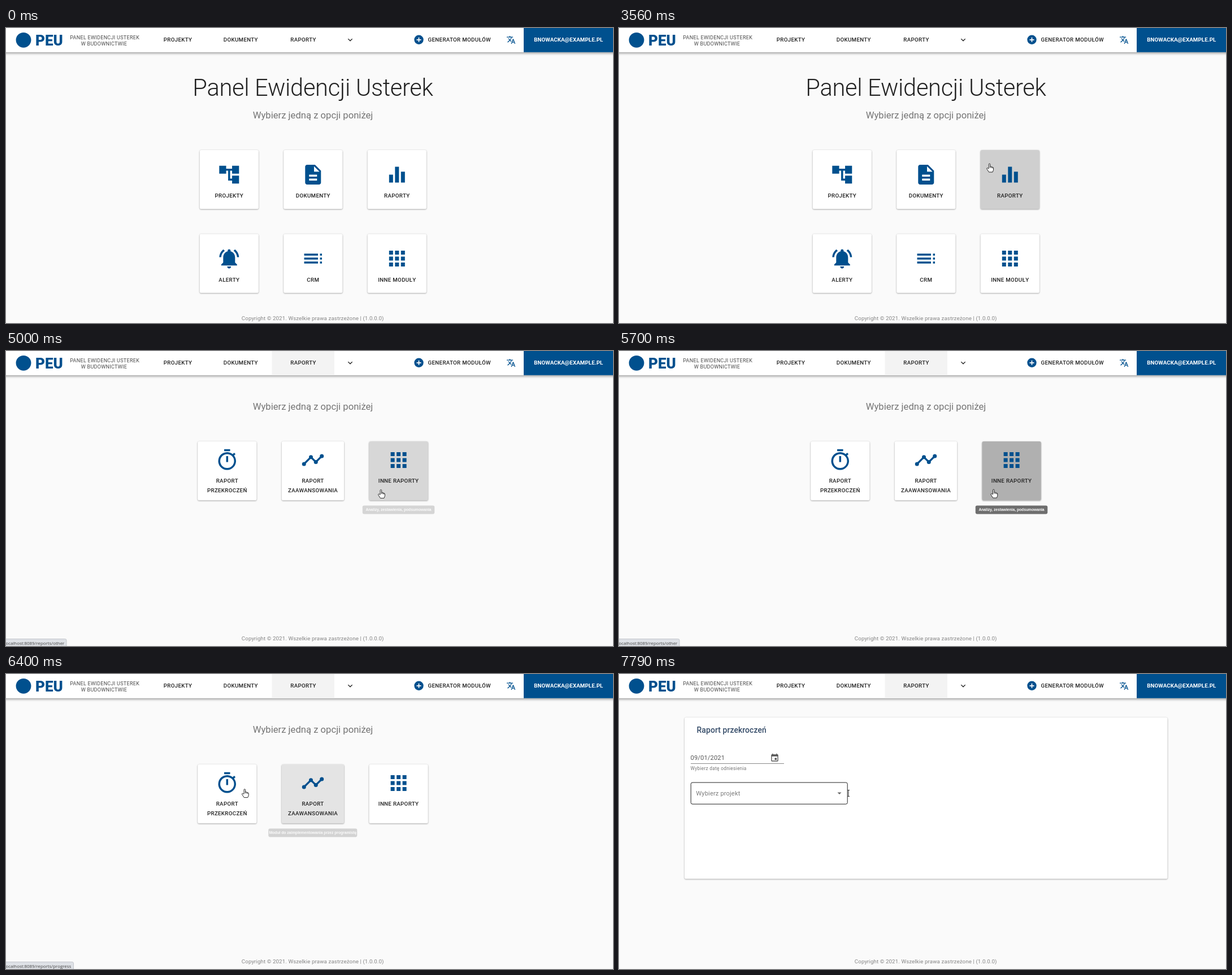
An HTML page that plays this animation: 1074 by 522 pixels, repeating every 8000 ms.

```html
<!DOCTYPE html>
<html lang="pl">
<head>
<meta charset="utf-8">
<title>Panel Ewidencji Usterek</title>
<style>
  html, body { margin: 0; width: 100%; height: 100%; overflow: hidden; background: #fafafa; }
  svg { display: block; }
  text { font-family: Roboto, sans-serif; white-space: pre; }
  .card { fill: #fff; filter: drop-shadow(0 1px 1px rgba(0,0,0,.28)) drop-shadow(0 0 1px rgba(0,0,0,.12)); }
  .bar { fill: #fff; filter: drop-shadow(0 2px 2px rgba(0,0,0,.38)); }
  .tip text { font: bold 6.7px "Liberation Sans", sans-serif; }
  .status text { font-family: "Open Sans", sans-serif; }
</style>
</head>
<body>
<svg id="stage" width="1074" height="522" viewBox="0 0 1074 522"></svg>
<script>
const BLUE = '#00508e', DARK = '#212121', SCALE = 0.694;
const ICONS = {
  tree: 'M22 11V3h-7v3H9V3H2v8h7V8h2v10h4v3h7v-8h-7v3h-2V8h2v3z',
  doc: 'M14 2H6c-1.1 0-2 .9-2 2v16c0 1.1.9 2 2 2h12c1.1 0 2-.9 2-2V8l-6-6zm2 16H8v-2h8v2zm0-4H8v-2h8v2zm-3-5V3.5L18.5 9H13z',
  bars: 'M10 20h4V4h-4v16zm-6 0h4v-8H4v8zM16 9v11h4V9h-4z',
  bell: 'M7.6 4.1L6.15 2.65C3.75 4.5 2.2 7.3 2 10.5h2c.15-2.65 1.5-5 3.6-6.4zm12.4 6.4h2c-.15-3.2-1.7-6-4.1-7.85l-1.45 1.45c2 1.4 3.4 3.75 3.55 6.4zM18 11c0-3.1-1.6-5.6-4.5-6.3V4c0-.8-.7-1.5-1.5-1.5s-1.5.7-1.5 1.5v.7C7.6 5.4 6 7.9 6 11v5l-2 2v1h16v-1l-2-2v-5zm-6 11c1.1 0 2-.9 2-2h-4c0 1.1.9 2 2 2z',
  list: 'M3 7h14v2H3zm0 4h14v2H3zm0 4h14v2H3zM19 7h2v2h-2zm0 4h2v2h-2zm0 4h2v2h-2z',
  apps: [4, 10, 16].map(y => `M4 ${y}h4v4H4zm6 0h4v4h-4zm6 0h4v4h-4z`).join(''),
  timer: 'M15 1H9v2h6V1zm-4 13h2V8h-2v6zm8-6.6l1.45-1.4c-.45-.5-.9-1-1.4-1.45L17.6 6C16.1 4.7 14.1 4 12 4a9 9 0 1 0 7 3.4zM12 20a7 7 0 1 1 0-14 7 7 0 0 1 0 14z',
  translate: 'M12.87 15.07l-2.54-2.51c1.8-2 3-4.2 3.74-6.56H17V4h-7V2H8v2H1v2h11.2C11.5 7.9 10.4 9.75 9 11.35 8.1 10.3 7.3 9.2 6.7 8h-2c.7 1.6 1.7 3.2 3 4.56l-5.1 5L4 19l5-5 3.1 3.1.77-2.03zM18.5 10h-2L12 22h2l1.1-3h4.8l1.1 3h2l-4.5-12zm-2.6 7l1.6-4.3 1.6 4.3h-3.2z',
  chevron: 'M7.4 8.6l4.6 4.6 4.6-4.6L18 10l-6 6-6-6z',
  calendar: 'M17 12h-5v5h5v-5zM16 1v2H8V1H6v2H5c-1.1 0-2 .9-2 2v14c0 1.1.9 2 2 2h14c1.1 0 2-.9 2-2V5c0-1.1-.9-2-2-2h-1V1h-2zm3 18H5V8h14v11z',
  drop: 'M7 10l5 5 5-5z'
};

function text(str, x, y, size, { fill = DARK, weight = 400, anchor = 'middle', gap = 0 } = {}) {
  return `<text x="${x}" y="${y}" font-size="${size}" fill="${fill}" font-weight="${weight}" text-anchor="${anchor}" letter-spacing="${gap}">${str}</text>`;
}
const label = (str, x, y) => text(str, x, y, 9.72, { weight: 500, gap: .32 });
const left = (str, x, y, size, fill, gap, weight) => text(str, x, y, size, { fill, gap, weight, anchor: 'start' });
const icon = (name, x, y, k = 1.75, fill = BLUE) =>
  `<path fill="${fill}" fill-rule="evenodd" transform="translate(${x} ${y}) scale(${k}) translate(-12 -12)" d="${name === 'line' ? '' : ICONS[name]}"/>`;

function lineChart(x, y) {
  const pts = [[-9, 4], [-2, -3], [3, 2], [9, -4]].map(p => [x + p[0] * 1.75, y + p[1] * 1.75]);
  return `<polyline points="${pts.join(' ')}" fill="none" stroke="${BLUE}" stroke-width="3.2"/>` +
    pts.map(([a, b]) => `<circle cx="${a}" cy="${b}" r="3.5" fill="${BLUE}"/>`).join('');
}

function card(id, x, y, w, glyph, lines, iconY, textY) {
  const cx = x + w / 2;
  return `<rect class="card" x="${x}" y="${y}" width="${w}" height="104.2" rx="2.8"/>
    <rect id="${id}-hover" x="${x}" y="${y}" width="${w}" height="104.2" rx="2.8" opacity="0"/>
    <svg x="${x}" y="${y}" width="${w}" height="104.2"><circle id="${id}-ripple" opacity=".14"/></svg>
    ${glyph === 'line' ? lineChart(cx, iconY) : icon(glyph, cx, iconY)}
    ${lines.map((s, i) => label(s, cx, textY + i * 16.4)).join('')}`;
}

function tip(id, cx, w, y, lines) {
  return `<g id="${id}-tip" class="tip" opacity="0">
    <rect x="${cx - w / 2}" y="${y}" width="${w}" height="${lines.length > 1 ? 26 : 15}" rx="2.8" fill="#6e6e6e"/>
    ${lines.map((s, i) => text(s, cx, y + 9.8 + i * 10, 6.7, { fill: '#fff' })).join('')}</g>`;
}

const prompt = y => text('Wybierz jedną z opcji poniżej', 543, y, 16.66, { fill: '#757575' });
const footer = y => text('Copyright © 2021. Wszelkie prawa zastrzeżone | (1.0.0.0)', 542.7, y, 9.72, { fill: '#858585', gap: .1 });
const homeCard = (id, col, row, glyph, name) =>
  card(id, 342.7 + col * 148.5, 216 + row * 148.5, 104.2, glyph, [name], 259.6 + row * 148.5, 300 + row * 148.5);
const reportCard = (id, x, w, glyph, lines) => card(id, x, 160, w, glyph, lines, 193, 233.4);

const home = `<g id="home">
  ${text('Panel Ewidencji Usterek', 543, 119.5, 41.6, { weight: 300, gap: -.3 })}
  ${prompt(160)}
  ${homeCard('projects', 0, 0, 'tree', 'PROJEKTY')}
  ${homeCard('docs', 1, 0, 'doc', 'DOKUMENTY')}
  ${homeCard('reports', 2, 0, 'bars', 'RAPORTY')}
  ${homeCard('alerts', 0, 1, 'bell', 'ALERTY')}
  ${homeCard('crm', 1, 1, 'list', 'CRM')}
  ${homeCard('more', 2, 1, 'apps', 'INNE MODUŁY')}
  ${tip('reports', 691.6, 51, 330, ['Raporty opis'])}
  ${footer(517)}</g>`;

const menu = `<g id="menu">
  ${prompt(104)}
  ${reportCard('excess', 339.2, 104.2, 'timer', ['RAPORT', 'PRZEKROCZEŃ'])}
  ${reportCard('progress', 487.8, 110.4, 'line', ['RAPORT', 'ZAAWANSOWANIA'])}
  ${reportCard('other', 642.5, 104.2, 'apps', ['INNE RAPORTY'])}
  ${tip('excess', 391, 218, 273.4, ['Raport przekroczeń ilości i kosztów względem założonego', 'budżetu projektu'])}
  ${tip('progress', 542.8, 157, 273.4, ['Moduł do zaimplementowania przez programistę'])}
  ${tip('other', 694.5, 127.5, 273.4, ['Analizy, zestawienia, podsumowania'])}
  ${footer(511.5)}</g>`;

const form = `<g id="form">
  <rect class="card" x="116" y="77" width="854.5" height="285.5" rx="2.8"/>
  ${left('Raport przekroczeń', 137.6, 103.5, 13.9, '#344b68', .1, 500)}
  ${left('09/01/2021', 126.6, 151.5, 11.1, '#555', .15)}
  ${icon('calendar', 275.5, 148.5, SCALE, '#555')}
  <path d="M127 158.5H292" stroke="#8a8a8a"/>
  ${left('Wybierz datę odniesienia', 126.6, 170.2, 8.33, '#757575', .28)}
  <rect id="select" x="127.2" y="192" width="277" height="38.2" rx="2.8" fill="none" stroke="${DARK}"/>
  ${left('Wybierz projekt', 136.3, 215, 11.1, '#7c7c7c', .15)}
  ${icon('drop', 390, 211, SCALE, '#666')}
  ${footer(511.5)}</g>`;

const header = `<rect class="bar" x="-9" y="-9" width="1092" height="51.8"/>
  <rect id="active" x="470.5" width="110.5" height="42.8" fill="#f3f3f3"/>
  <circle cx="31" cy="21.3" r="13.4" fill="${BLUE}"/>
  ${left('PEU', 52, 30.5, 26, BLUE, 0, 800)}
  ${text('PANEL EWIDENCJI USTEREK', 174.7, 20.3, 9, { fill: '#4a4a4a', gap: .3 })}
  ${text('W BUDOWNICTWIE', 173.5, 31.4, 9, { fill: '#4a4a4a', gap: .3 })}
  ${label('PROJEKTY', 304, 24)}${label('DOKUMENTY', 415.3, 24)}${label('RAPORTY', 526, 24)}
  ${icon('chevron', 609, 21, SCALE, DARK)}
  <circle cx="730.5" cy="20.8" r="8.2" fill="${BLUE}"/>
  <path d="M726.5 20.8h8M730.5 16.8v8" stroke="#fff" stroke-width="1.7"/>
  ${label('GENERATOR MODUŁÓW', 802.3, 24)}
  ${icon('translate', 893.6, 21, SCALE)}
  <rect x="916" width="158" height="42.8" fill="${BLUE}"/>
  ${text('BNOWACKA@EXAMPLE.PL', 995.3, 23.8, 9.72, { fill: '#fff', weight: 700, gap: .1 })}`;

const status = `<g id="status" class="status">
  <rect id="status-box" x="-5" y="509.5" height="20" rx="2.5" fill="#dee1e6" stroke="#c4c7cc"/>
  ${left('', -2.6, 519.8, 7.9, '#444', 0).replace('<text', '<text id="status-text"')}</g>`;

const pointer = `<g id="pointer" stroke-linejoin="round">
  <path id="arrow" d="M.5.5v11.6l2.7-2.5 2 4.8 2-.9-2-4.6h3.4z" fill="#fff" stroke="#111" stroke-width=".9"/>
  <path id="hand" d="M-1.2 8.5V1.2Q-1.1 0 0 0t1.2 1.2V5q1.9-.6 2.2.7 1.7-.5 2 .8 1.6-.2 1.6 1.4v3.4L5.5 15H-1L-4.6 9.4q-.7-1.5 1-1.8 1 0 2.4 1.7M1.2 5v2.6M3.4 5.7v2.2M5.4 6.5v1.8" fill="#fff" stroke="#111" stroke-width=".9"/>
  <path id="beam" d="M-2-5.5h4M0-5.5v11M-2 5.5h4" fill="none" stroke="#333"/></g>`;

document.getElementById('stage').innerHTML = home + menu + form + header + status + pointer;

const el = id => document.getElementById(id);
const set = (id, name, value) => el(id).setAttribute(name, value);
const show = (id, on) => set(id, 'display', on ? 'inline' : 'none');
const ramp = (t, a, b) => Math.min(1, Math.max(0, (t - a) / (b - a)));
const pulse = (t, a, b, c, d) => ramp(t, a, b) - ramp(t, c, d);

const LOOP = 8000, TO_MENU = 4830, TO_FORM = 7080;
// time, x, y of the pointer
const PATH = [
  [380, 1043, 512], [700, 828, 191], [940, 828, 191], [1270, 460, 196], [1570, 128, 221],
  [1710, 143, 224], [1780, 143, 224], [1830, 152, 225], [2780, 152, 225], [3130, 390, 186],
  [3430, 640, 228], [3560, 655.5, 240], [3670, 655.5, 240], [3850, 664, 246], [5700, 663, 245],
  [6150, 545, 228], [6400, 422.5, 203.5], [6470, 406, 211], [LOOP, 406, 211]
];
// start time, address shown, box width
const LINKS = [
  [0, '', 0], [3670, 'reports', 84], [4920, 'reports/other', 107], [5790, '', 0],
  [5960, 'reports/progress', 119.5], [6440, 'reports/excess', 108]
];

function pointerAt(t) {
  const i = Math.max(1, PATH.findIndex(p => p[0] > t));
  const [a, b] = [PATH[i - 1], PATH[i]], k = ramp(t, a[0], b[0]);
  return [a[1] + (b[1] - a[1]) * k, a[2] + (b[2] - a[2]) * k];
}

function hover(id, shade, tipShade) {
  set(id + '-hover', 'opacity', .31 * shade);
  set(id + '-tip', 'opacity', tipShade);
}

function ripple(id, t, start, x, y) {
  set(id + '-ripple', 'cx', x);
  set(id + '-ripple', 'cy', y);
  set(id + '-ripple', 'r', 110 * ramp(t, start, start + 450));
}

function draw(t) {
  show('home', t < TO_MENU);
  show('menu', t >= TO_MENU && t < TO_FORM);
  show('form', t >= TO_FORM);
  show('active', t >= TO_MENU);

  hover('reports', ramp(t, 3440, 3640), ramp(t, 3830, 4040));
  hover('other', pulse(t, 4900, 5100, 5773, 5973), pulse(t, 4950, 5150, 5773, 5950));
  hover('progress', pulse(t, 5946, 6146, 6270, 6470), pulse(t, 6080, 6200, 6270, 6450));
  hover('excess', ramp(t, 6410, 6610), ramp(t, 6480, 6630));
  ripple('reports', t, 4550, 24, 31);
  ripple('excess', t, 6850, 66.8, 51);
  set('select', 'stroke-opacity', .4 + .6 * ramp(t, 7200, 7420));

  const [, page, width] = LINKS.filter(l => l[0] <= t).pop();
  show('status', page);
  set('status', 'opacity', 1 - ramp(t, 7600, 7780));
  set('status-box', 'width', width + 5);
  el('status-text').textContent = 'localhost:8089/' + page;

  const free = t < 3430 || (t > 5773 && t < 5946) || (t > 6270 && t < 6360);
  show('pointer', t >= 380);
  set('pointer', 'transform', `translate(${pointerAt(t)})`);
  show('arrow', free);
  show('hand', !free && t < TO_FORM);
  show('beam', t >= TO_FORM);
}

const start = performance.now();
function frame() {
  draw((performance.now() - start) % LOOP);
  requestAnimationFrame(frame);
}
frame();
</script>
</body>
</html>
```
